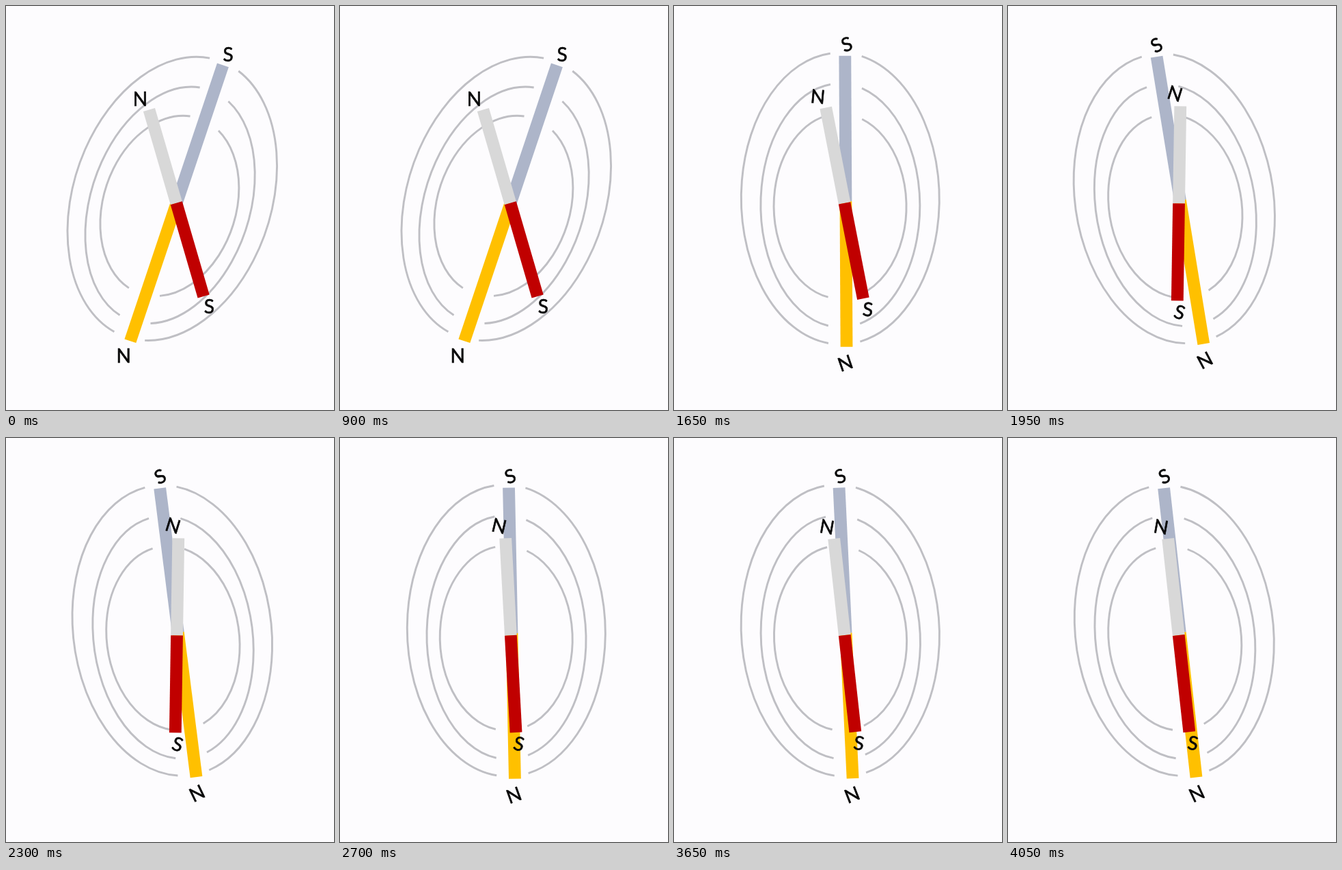
Animation, 480 px wide and 590 px high, one loop 5 s. Source, as an HTML page with a canvas:

```html
<!DOCTYPE html>
<html lang="en">
<head>
<meta charset="utf-8">
<title>Two magnets</title>
<style>
  html, body { margin: 0; width: 100%; height: 100%; overflow: hidden; background: #fdfcfe; }
  canvas { display: block; width: 480px; height: 590px; }
</style>
</head>
<body>
<canvas id="stage" width="480" height="590"></canvas>
<script>
const ctx = document.getElementById('stage').getContext('2d');
const LOOP = 5000, STEP = 50;
const rad = deg => deg * Math.PI / 180;

// Each magnet is described in its starting pose, relative to its pivot.
// turns: [start ms, end ms, degrees], all at constant speed.
const outer = {
  pivot: [242.8, 281.2], tilt: 18.6, center: [8.6, 4.1], half: 212.5,
  colors: ['#adb5c9', '#ffc000'],
  labels: [['S', 82.3, -210], ['N', -70.5, 230]],
  turns: [[1020, 2020, -30], [2020, 3020, 15], [3020, 4020, -10]],
  // center x, center y, half width, half height
  rings: [[0.5, 0, 145, 213], [0.5, 10, 116.5, 178], [0.2, 11.3, 97, 135]]
};
const inner = {
  pivot: [247.7, 290.5], tilt: -16.3, center: [2.3, -2.2], half: 142,
  colors: ['#d8d8d8', '#c00000'],
  labels: [['N', -51.3, -154.3], ['S', 49.6, 148.7]],
  turns: [[1520, 2020, 20], [2020, 3020, -10]],
  rings: []
};

const BAR = 17.8;
const TOP_GAP = [-13, 33], BOTTOM_GAP = [-18, 28.5];

function turned(turns, t) {
  return turns.reduce((sum, [from, to, deg]) =>
    sum + deg * Math.min(1, Math.max(0, (t - from) / (to - from))), 0);
}

function drawRing([cx, cy, rx, ry]) {
  const at = x => Math.acos((x - cx) / rx);
  const arc = (from, to) => {
    ctx.beginPath();
    ctx.ellipse(cx, cy, rx, ry, 0, from, to);
    ctx.stroke();
  };
  ctx.strokeStyle = '#bfbfc4';
  ctx.lineWidth = 2.9;
  arc(-at(TOP_GAP[1]), at(BOTTOM_GAP[1]));
  arc(at(BOTTOM_GAP[0]), 2 * Math.PI - at(TOP_GAP[0]));
}

function drawBar({ center: [x, y], half, colors }) {
  ctx.fillStyle = colors[0];
  ctx.fillRect(x - BAR / 2, y - half, BAR, half);
  ctx.fillStyle = colors[1];
  ctx.fillRect(x - BAR / 2, y, BAR, half);
}

function drawLabel([text, x, y]) {
  ctx.fillStyle = ctx.strokeStyle = '#080808';
  ctx.lineWidth = 0.6;
  ctx.fillText(text, x, y + 10);
  ctx.strokeText(text, x, y + 10);
}

function drawMagnet(m, t) {
  ctx.save();
  ctx.translate(...m.pivot);
  ctx.rotate(rad(turned(m.turns, t)));

  ctx.save();
  ctx.rotate(rad(m.tilt));
  m.rings.forEach(drawRing);
  drawBar(m);
  ctx.restore();

  m.labels.forEach(drawLabel);
  ctx.restore();
}

function draw(now) {
  const t = Math.floor((now % LOOP) / STEP) * STEP;
  ctx.fillStyle = '#fdfcfe';
  ctx.fillRect(0, 0, 480, 590);
  ctx.font = '28px Lato, sans-serif';
  ctx.textAlign = 'center';
  drawMagnet(outer, t);
  drawMagnet(inner, t);
}

const start = performance.now();
function tick() {
  draw(performance.now() - start);
  requestAnimationFrame(tick);
}
tick();
</script>
</body>
</html>
```
